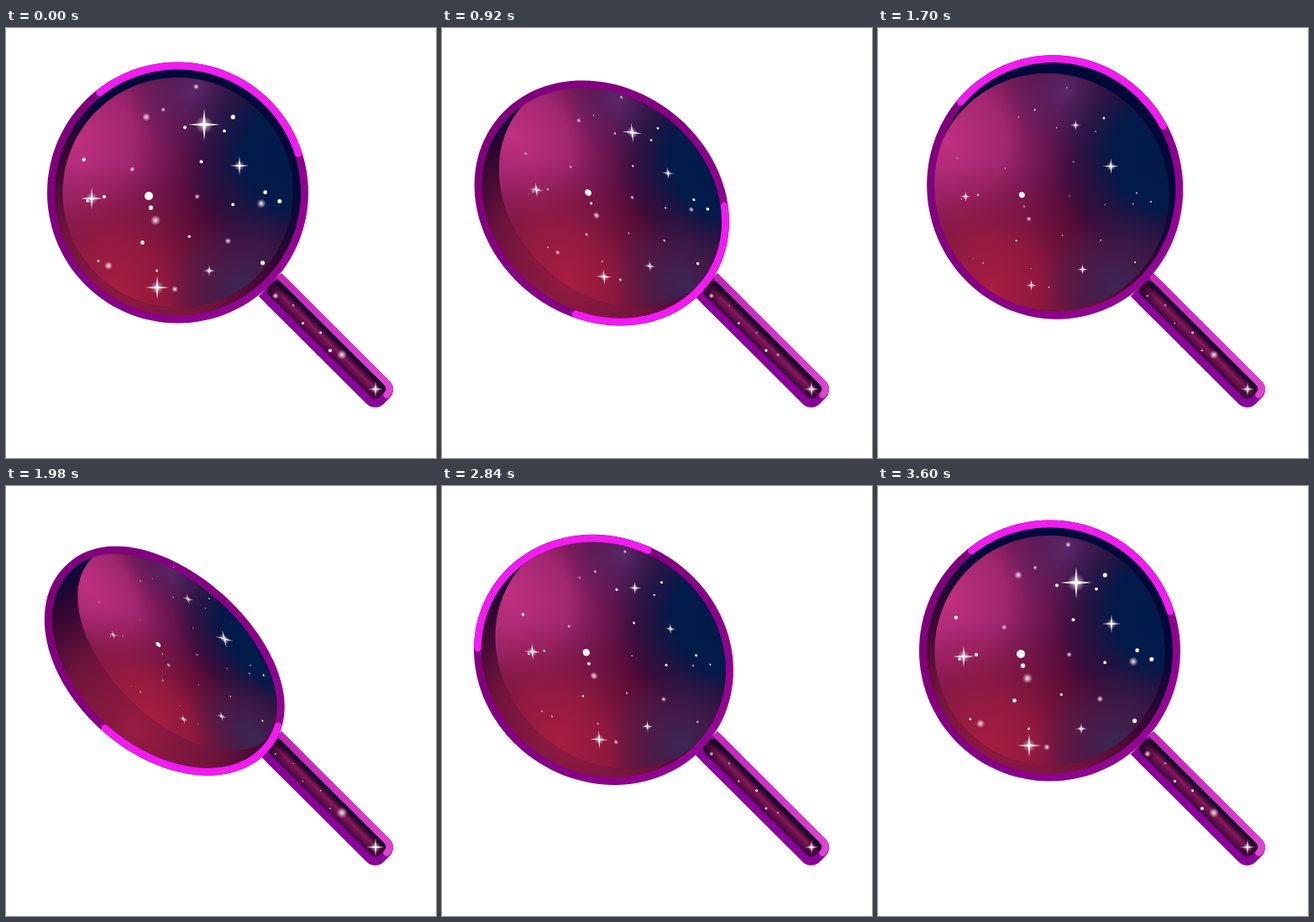
These frames come from a looping animation (512x512 px, 3.62 s). An HTML page:

```html
<!DOCTYPE html>
<html lang="en">
<head>
<meta charset="utf-8">
<title>Starry magnifier</title>
<style>
html, body { margin: 0; width: 100%; height: 100%; overflow: hidden; background: #fff; }
svg { display: block; width: 100vw; height: 100vh; }
</style>
</head>
<body>
<svg viewBox="0 0 512 512">
  <defs>
    <clipPath id="rimClip"><path id="rimArea"/></clipPath>
    <clipPath id="lensClip"><path id="lensArea"/></clipPath>
    <radialGradient id="wall" gradientUnits="userSpaceOnUse" cx="155" cy="290" r="215">
      <stop offset="0" stop-color="#971c42"/><stop offset=".45" stop-color="#70143b"/>
      <stop offset=".78" stop-color="#300632"/><stop offset="1" stop-color="#00083a"/>
    </radialGradient>
    <radialGradient id="pink" gradientUnits="userSpaceOnUse" cx="80" cy="135" r="180">
      <stop offset="0" stop-color="#c03080"/><stop offset=".4" stop-color="#aa2a76" stop-opacity=".9"/>
      <stop offset="1" stop-color="#701a58" stop-opacity="0"/>
    </radialGradient>
    <radialGradient id="red" gradientUnits="userSpaceOnUse" cx="130" cy="315" r="155">
      <stop offset="0" stop-color="#a81e42"/><stop offset=".4" stop-color="#9c1c40" stop-opacity=".85"/>
      <stop offset="1" stop-color="#801438" stop-opacity="0"/>
    </radialGradient>
    <radialGradient id="navy" gradientUnits="userSpaceOnUse" cx="345" cy="150" r="140">
      <stop offset="0" stop-color="#001a4a"/><stop offset=".45" stop-color="#021b4a"/>
      <stop offset="1" stop-color="#181848" stop-opacity="0"/>
    </radialGradient>
    <radialGradient id="dust" gradientUnits="userSpaceOnUse" cx="285" cy="310" r="95">
      <stop offset="0" stop-color="#3c2856" stop-opacity=".95"/><stop offset="1" stop-color="#402858" stop-opacity="0"/>
    </radialGradient>
    <radialGradient id="violet" gradientUnits="userSpaceOnUse" cx="225" cy="75" r="80">
      <stop offset="0" stop-color="#5c2c70" stop-opacity=".85"/><stop offset="1" stop-color="#502060" stop-opacity="0"/>
    </radialGradient>
    <linearGradient id="rimTone" gradientUnits="userSpaceOnUse" x1="80" y1="100" x2="340" y2="280">
      <stop offset="0" stop-color="#80007c"/><stop offset=".6" stop-color="#860084"/><stop offset="1" stop-color="#940694"/>
    </linearGradient>
    <linearGradient id="core" x1="0" y1="0" x2="0" y2="1">
      <stop offset="0" stop-color="#0a0028"/><stop offset=".17" stop-color="#240430"/>
      <stop offset=".5" stop-color="#861858"/><stop offset=".75" stop-color="#600e48"/>
      <stop offset="1" stop-color="#3c0640"/>
    </linearGradient>
    <linearGradient id="shade">
      <stop offset="0" stop-color="#14001e" stop-opacity=".75"/><stop offset=".13" stop-color="#14001e" stop-opacity="0"/>
      <stop offset=".9" stop-color="#14001e" stop-opacity="0"/><stop offset="1" stop-color="#14001e" stop-opacity=".6"/>
    </linearGradient>
    <linearGradient id="edge" gradientUnits="userSpaceOnUse" x1="0" y1="0" x2="190" y2="0">
      <stop offset="0" stop-color="#c424b8"/><stop offset="1" stop-color="#dc44cc"/>
    </linearGradient>
    <radialGradient id="glow">
      <stop offset="0" stop-color="#fff" stop-opacity=".95"/><stop offset=".35" stop-color="#ffe4f4" stop-opacity=".65"/>
      <stop offset="1" stop-color="#ffc0e4" stop-opacity=".05"/>
    </radialGradient>
  </defs>

  <g transform="translate(314.5 305.5) rotate(44.9)">
    <rect x="0" y="-19" width="196" height="38.5" rx="14" fill="#8a009a"/>
    <rect x="0" y="-19" width="40" height="38.5" fill="#8a009a"/>
    <path d="M4-15H181Q191-15 191-5" fill="none" stroke="url(#edge)" stroke-width="8" stroke-linecap="round"/>
    <rect x="0" y="-11" width="187" height="21" rx="8" fill="url(#core)"/>
    <rect x="0" y="-11" width="187" height="21" rx="8" fill="url(#shade)"/>
  </g>
  <g id="handleStars"></g>

  <path id="rimFill" fill="url(#wall)"/>
  <g clip-path="url(#rimClip)"><g clip-path="url(#lensClip)"><g id="sky"></g></g></g>
  <path id="rim" fill="none" stroke="url(#rimTone)" stroke-width="9"/>
  <path id="shine" fill="none" stroke="#f01cf0" stroke-width="8.6" stroke-linecap="round"/>
  <g id="lensStars"></g>
</svg>
<script>
const LOOP = 3620, CX = 204.5, CY = 196, R = Math.SQRT1_2, RAD = Math.PI / 180;
const $ = id => document.getElementById(id);
const clamp = x => Math.max(-1, Math.min(1, x));

let seed = 11;
const rnd = (lo, hi) => {
  seed = seed * 16807 % 2147483647;
  return lo + (hi - lo) * seed / 2147483647;
};

function add(parent, tag, attrs) {
  const el = document.createElementNS('http://www.w3.org/2000/svg', tag);
  for (const k in attrs) el.setAttribute(k, attrs[k]);
  return parent.appendChild(el);
}

// Smooth curve through [time, value] keys without overshoot
function curve(...keys) {
  const n = keys.length;
  const d = keys.slice(1).map((k, i) => (k[1] - keys[i][1]) / (k[0] - keys[i][0]));
  const m = keys.map((k, i) =>
    i === 0 || i === n - 1 || d[i - 1] * d[i] <= 0 ? 0 : 2 * d[i - 1] * d[i] / (d[i - 1] + d[i]));
  return t => {
    let i = 0;
    while (i < n - 2 && t > keys[i + 1][0]) i++;
    const h = keys[i + 1][0] - keys[i][0], s = (t - keys[i][0]) / h, q = 1 - s;
    return keys[i][1] * (1 + 2 * s) * q * q + m[i] * h * s * q * q
      + keys[i + 1][1] * s * s * (3 - 2 * s) - m[i + 1] * h * s * s * q;
  };
}

// Wind up backwards, then one full turn; the shine circles twice
const spin = curve([0, 0], [820, -35], [1300, -31], [1640, 0], [1980, 126], [2420, 286], [2840, 333], [LOOP, 360]);
const sweep = curve([0, 232], [540, 285], [1300, 455], [1980, 677], [2420, 836], [2840, 904], [LOOP, 952]);

// u runs along the handle, v to the upper right
const place = (u, v) => (CX + (u + v) * R).toFixed(2) + ' ' + (CY + (u - v) * R).toFixed(2);

function outline(from, to, point) {
  const pts = [], n = 120;
  for (let i = 0; i <= n; i++) pts.push(point((from + (to - from) * i / n) * RAD));
  return 'M' + pts.join('L');
}

const stars = [];
function star(parent, kind, x, y, r, cycles = 1, peak = 0, low = .5) {
  const g = add(parent, 'g', {});
  if (kind === 'spark') {
    add(g, 'circle', { r: .55, fill: 'url(#glow)', opacity: .8 });
    add(g, 'path', { d: 'M0-1L.09-.09 1 0 .09.09 0 1-.09.09-1 0-.09-.09Z', fill: '#fff' });
  } else {
    add(g, 'circle', { r: 1, fill: kind === 'glow' ? 'url(#glow)' : '#fff' });
  }
  stars.push({ g, x, y, r, cycles, peak, low });
}

const lens = $('lensStars'), grip = $('handleStars');
star(lens, 'spark', 236, 115, 19, 3, 0, .3);
star(lens, 'spark', 278, 164, 14, 2, 350, .4);
star(lens, 'spark', 102, 203, 13);
star(lens, 'spark', 180, 309, 14);
star(lens, 'spark', 242, 289, 8, 2, 600, .85);
star(lens, 'dot', 170, 200, 5, 1, 0, .7);
star(lens, 'glow', 178, 229, 6);
star(lens, 'glow', 304, 209, 5.4, 3, 0, .2);
star(lens, 'glow', 122, 283, 5, 3, 0, .2);
star(lens, 'glow', 167, 106, 4.8, 3, 0, .2);

// Sunflower scatter for the small ones
for (let i = 0; i < 22; i++) {
  const r = 132 * Math.sqrt((i + .7) / 22), f = i * 2.4 + rnd(.2, .9);
  star(lens, i % 4 ? 'dot' : 'glow', CX + r * Math.cos(f), CY + r * Math.sin(f),
    i % 4 ? rnd(1.3, 2.8) : rnd(2.5, 4.2), i % 3 ? 1 : 3, rnd(-200, 200), .35);
}

star(grip, 'spark', 440, 430, 12, 2, 450, .55);
star(grip, 'glow', 400, 389, 6.3, 2, 200, .25);
for (let i = 0; i < 5; i++) {
  const along = 23 * i + 14, off = i % 2 ? -2 : 5;
  star(grip, i ? 'dot' : 'glow', 314.5 + (along - off) * R, 305.5 + (along + off) * R,
    i ? 1 + i * .27 : 4, i % 2 ? 3 : 1, 200, .4);
}

const paint = fill => add($('sky'), 'rect', { x: -100, y: -100, width: 712, height: 712, fill });
paint('#460834');
['pink', 'red', 'violet', 'navy', 'dust'].forEach(id => paint(`url(#${id})`));

function draw(t) {
  const a = spin(t) * RAD, c = Math.max(Math.abs(Math.cos(a)), .03);
  const s = Math.abs(Math.sin(a)), s2 = s * s, thin = s2 ** 3;
  const twice = Math.sin(2 * a), side = clamp(2 * twice), flip = Math.cos(a) < 0 ? -1 : 1;

  // Rim: tilted circle with some thickness, flatter on the far side
  const len = 151 + 12 * s2, wide = 151 * c + 20 * s ** 1.5, egg = 14 * thin * side;
  const rimPoint = f => {
    const sin = -Math.sin(f) * flip, u = len * Math.cos(f);
    const far = sin * side < 0;
    const v = Math.sign(sin) * Math.abs(sin) ** (far ? 1 - .3 * thin : 1);
    return place(u - 4 * s2, v * (wide + (v > 0 ? egg : -egg)) + 20 * twice - .034 * u * side);
  };
  const rim = outline(0, 360, rimPoint) + 'Z';
  for (const id of ['rim', 'rimFill', 'rimArea']) $(id).setAttribute('d', rim);
  const start = sweep(t) - 45;
  $('shine').setAttribute('d', outline(start, start + 110 - 14 * thin, rimPoint));

  // Glass at the back of the rim
  const shift = (10 * s - 20 * s2) * side;
  const gl = 137 + 13 * Math.min(1, 2 * s), gw = Math.max(1, 137 * c + 14 * Math.abs(twice) * c - 8 * thin);
  $('lensArea').setAttribute('d', outline(0, 360, f => place(gl * Math.cos(f), gw * Math.sin(f) + shift)) + 'Z');

  const p = (1 + c) / 2, q = (1 - c) / 2;
  const m = `matrix(${[p, q, q, p, CX - p * CX - q * CY + shift * R, CY - q * CX - p * CY - shift * R]})`;
  $('sky').setAttribute('transform', m);
  lens.setAttribute('transform', m);

  for (const k of stars) {
    const wave = .5 + .5 * Math.cos((t - k.peak) / LOOP * k.cycles * 2 * Math.PI);
    k.g.setAttribute('transform', `translate(${k.x} ${k.y}) scale(${k.r * (k.low + (1 - k.low) * wave)})`);
  }
}

const begin = performance.now();
function tick() {
  draw((performance.now() - begin) % LOOP);
  requestAnimationFrame(tick);
}
draw(0);
requestAnimationFrame(tick);
</script>
</body>
</html>
```
